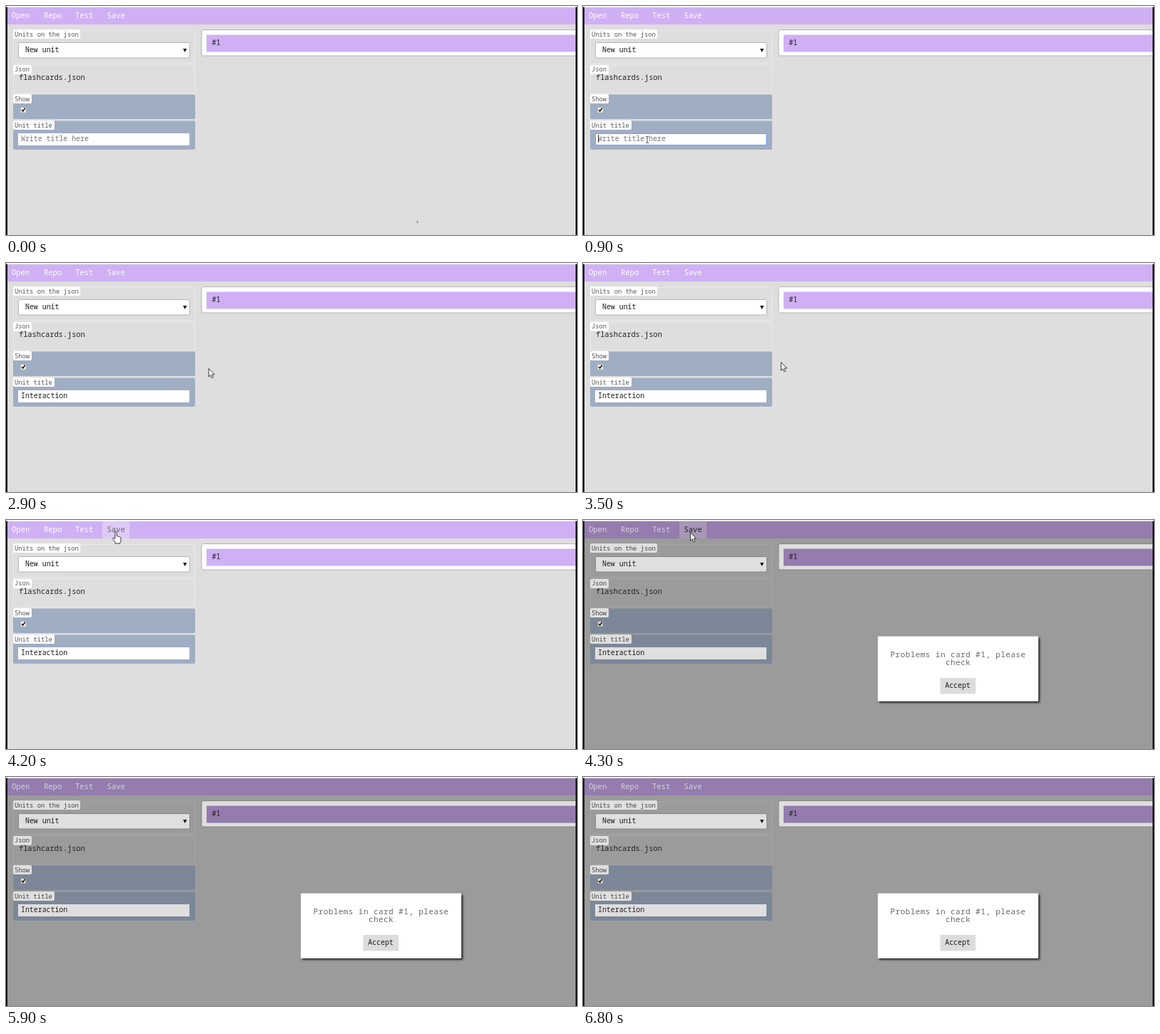
Recreate the animation shown at these times as an HTML page. Size 800x322 px, loop 7000 ms.

```html
<!DOCTYPE html>
<html lang="en">
<head>
<meta charset="utf-8">
<title>Flashcard editor</title>
<style>
  html, body { margin: 0; width: 100%; height: 100%; overflow: hidden; background: #dedede; }
  svg {
    display: block; width: 800px; height: 322px;
    font: 10.3px "Noto Sans Mono", "DejaVu Sans Mono", monospace;
    --page: #dedede; --edge: #e9e9e9; --paper: #fff; --line: #b4b4b4;
    --bar: #cfb0f4; --link: #fff; --hover: #dfcaf7; --hoverText: #666;
    --blue: #a0aec4; --label: #555;
    animation: dim 7s step-end infinite;
  }
  text { white-space: pre; }
  .page { fill: var(--page); }
  .paper { fill: var(--paper); }
  .bar { fill: var(--bar); }
  .blue { fill: var(--blue); }
  .frame { fill: none; stroke: var(--edge); }
  .box { fill: var(--paper); stroke: var(--line); }
  .link { fill: var(--link); font-size: 10.5px; }
  .label { fill: var(--label); font-size: 8.8px; }
  .field { fill: #1c1c1c; font-size: 9.9px; }
  .hint { fill: #757575; }

  /* Timed parts: hidden unless their keyframes show them. */
  .timed { visibility: hidden; animation: 7s step-end infinite; }
  .tick { animation-name: tick; }
  .hint { animation-name: hint; }
  .filled { animation-name: filled; }
  .focus { animation-name: focus; }
  .spell { animation-name: spell; }
  .hover { animation-name: hover; }
  .modal { animation-name: modal; }
  .arrow { animation-name: arrow; }
  .beam { animation-name: beam; }
  .hand { animation-name: hand; }
  .typing { animation: typing 7s step-end infinite; }
  .pointer { animation: move 7s infinite; }

  @keyframes tick { 0% { visibility: visible } 1.42% { visibility: hidden } }
  @keyframes hint { 0% { visibility: visible } 14.28% { visibility: hidden } }
  @keyframes filled { 14.28% { visibility: visible } }
  @keyframes focus { 12.85% { visibility: visible } 37.14% { visibility: hidden } }
  @keyframes spell { 27.14% { visibility: visible } 37.14% { visibility: hidden } }
  @keyframes hover { 58.56% { visibility: visible } 67.13% { visibility: hidden } }
  @keyframes modal { 61.42% { visibility: visible } }
  @keyframes arrow {
    1.42%, 31.42% { visibility: visible }
    9.99%, 58.56% { visibility: hidden }
    61.42% { visibility: visible }
    68.56% { visibility: hidden }
  }
  @keyframes beam { 9.99% { visibility: visible } 31.42% { visibility: hidden } }
  @keyframes hand { 58.56% { visibility: visible } 61.42% { visibility: hidden } }

  @keyframes typing {
    0% { transform: translateX(0) }
    14.28% { transform: translateX(11.9px) }
    15.71% { transform: translateX(17.8px) }
    17.14% { transform: translateX(23.8px) }
    18.57% { transform: translateX(29.7px) }
    21.42% { transform: translateX(35.6px) }
    25.71% { transform: translateX(47.5px) }
    27.14% { transform: translateX(59.4px) }
    28.57% { transform: translateX(65.3px) }
  }

  @keyframes move {
    0% { transform: translate(576px, 303px); animation-timing-function: steps(7) }
    9.99%, 12.85% { transform: translate(90px, 188px); animation-timing-function: steps(4) }
    18.56%, 28.56% { transform: translate(81px, 195px); animation-timing-function: steps(5) }
    35.7%, 39.99% { transform: translate(285px, 150px); animation-timing-function: steps(5) }
    47.13%, 49.99% { transform: translate(277px, 139px); animation-timing-function: steps(6) }
    58.56% { transform: translate(155px, 20px); animation-timing-function: step-end }
    59.99% { transform: translate(154px, 17px); animation-timing-function: step-end }
    61.42%, 64.28% { transform: translate(150px, 17px); animation-timing-function: steps(3) }
    68.56%, 100% { transform: translate(140px, -16px) }
  }

  @keyframes dim {
    61.42% {
      --page: #9b9b9b; --edge: #a5a5a5; --paper: #dfdfdf; --line: #858585;
      --bar: #947cae; --link: #d8d0e0; --hover: #a797b6; --hoverText: #222;
      --blue: #7c8798; --label: #444;
    }
  }
</style>
</head>
<body>
<svg viewBox="0 0 800 322">
  <rect class="page" width="800" height="322"/>

  <!-- Menu bar -->
  <rect class="bar" y="2" width="800" height="24"/>
  <text class="link" x="8" y="17">Open</text>
  <text class="link" x="53" y="17">Repo</text>
  <text class="link" x="97" y="17">Test</text>
  <text class="link" x="141.5" y="17">Save</text>
  <g class="timed hover">
    <rect x="135" y="2" width="38" height="24" style="fill:var(--hover)"/>
    <text class="link" x="141.5" y="17" style="fill:var(--hoverText)">Save</text>
  </g>

  <!-- Unit list -->
  <rect class="frame" x="10.5" y="34.5" width="254" height="46" rx="1.5"/>
  <rect class="paper" x="10" y="33" width="94" height="13" rx="2"/>
  <text class="label" x="12" y="42.5">Units on the json</text>
  <rect class="box" x="17.5" y="51.5" width="240" height="21.5" rx="2"/>
  <text class="field" x="27" y="65">New unit</text>
  <path d="M248 60h5.4l-2.7 5z" fill="#111"/>

  <!-- File name -->
  <rect class="frame" x="10.5" y="82.5" width="254" height="40.5" rx="1.5"/>
  <rect class="paper" x="10" y="83" width="26" height="13" rx="2"/>
  <text class="label" x="12" y="92">Json</text>
  <text x="18" y="104" fill="#222">flashcards.json</text>

  <!-- Show -->
  <rect class="blue" x="10" y="124.5" width="255" height="34.5" rx="2"/>
  <rect class="paper" x="10" y="124" width="26" height="13" rx="2"/>
  <text class="label" x="12" y="133.5">Show</text>
  <rect x="20.5" y="142.5" width="7.5" height="7.5" rx="1" style="fill:var(--paper);stroke:var(--line)"/>
  <path d="M22 146l1.7 2 3-4.5" fill="none" stroke="#111" stroke-width="1.6"/>

  <!-- Unit title -->
  <rect class="blue" x="10" y="161.5" width="255" height="40.5" rx="2"/>
  <rect class="paper" x="10" y="161" width="58" height="13" rx="2"/>
  <text class="label" x="12" y="171">Unit title</text>
  <rect class="paper" x="17" y="179" width="240" height="17"/>
  <rect class="timed focus" x="17.5" y="179.5" width="239.5" height="16" fill="none" stroke="#6f9fe6"/>
  <text class="field timed hint" x="21" y="190" style="fill:#757575">Write title here</text>
  <text class="field timed filled" x="21" y="190">Interaction</text>
  <path class="timed spell" d="M22 191.7H87" stroke="#d8474b" stroke-width="1.2" stroke-dasharray="2 1"/>
  <g class="typing">
    <rect class="paper timed filled" x="21.3" y="181" width="70" height="13"/>
    <path class="timed focus" d="M21.5 181v11" stroke="#222" stroke-width=".9"/>
  </g>

  <!-- Card -->
  <rect class="box" x="274" y="33.5" width="540" height="36.5" rx="2.5"/>
  <rect class="bar" x="281" y="40.5" width="519" height="24"/>
  <text class="field" x="288.5" y="55">#1</text>

  <!-- Dialog -->
  <g class="timed modal" text-anchor="middle">
    <rect x="413" y="163.5" width="225" height="91.5" rx="1" fill="#fff" style="filter:drop-shadow(2px 2px 1.5px #222)"/>
    <g fill="#686868" font-size="11" letter-spacing=".43">
      <text x="525.5" y="192.5">Problems in card #1, please</text>
      <text x="525.5" y="204">check</text>
    </g>
    <rect x="500.5" y="222" width="49.5" height="22.5" fill="#dcdcdc"/>
    <text class="field" x="525" y="236">Accept</text>
  </g>

  <!-- Window edges -->
  <rect width="800" height="1.5" fill="#fff"/>
  <path d="M0 1.5h2V322H0zM798 1.5h2V322h-2z" fill="#141414"/>

  <!-- Pointer -->
  <path class="timed tick" d="M575.8 302.5l1 2.7" stroke="#444"/>
  <g class="pointer">
    <path class="timed arrow" d="M.5.5v11.6l2.6-2.4 1.8 4.1 2-.9-1.8-4h3.6z" fill="#fff" stroke="#222" stroke-width=".9"/>
    <path class="timed beam" d="M-2-4.5h1.4l.6.6.6-.6H2M0-4V4M-2 4.5h1.4l.6-.6.6.6H2" fill="none" stroke="#222" stroke-width=".8"/>
    <path class="timed hand" d="M-1.2.8q0-1.3 1.2-1.3t1.2 1.3v5q1.8-.7 2.2.6 1.6-.5 2 .6 1.6-.2 1.6 1.2v3q0 2-1.2 3.4v1.4H-.8V14.700l-3.400-5q-.5-1.500.6-1.800.9-.2 2.400 1.600z" fill="#fff" stroke="#222" stroke-width=".9" stroke-linejoin="round"/>
  </g>
</svg>
</body>
</html>
```
